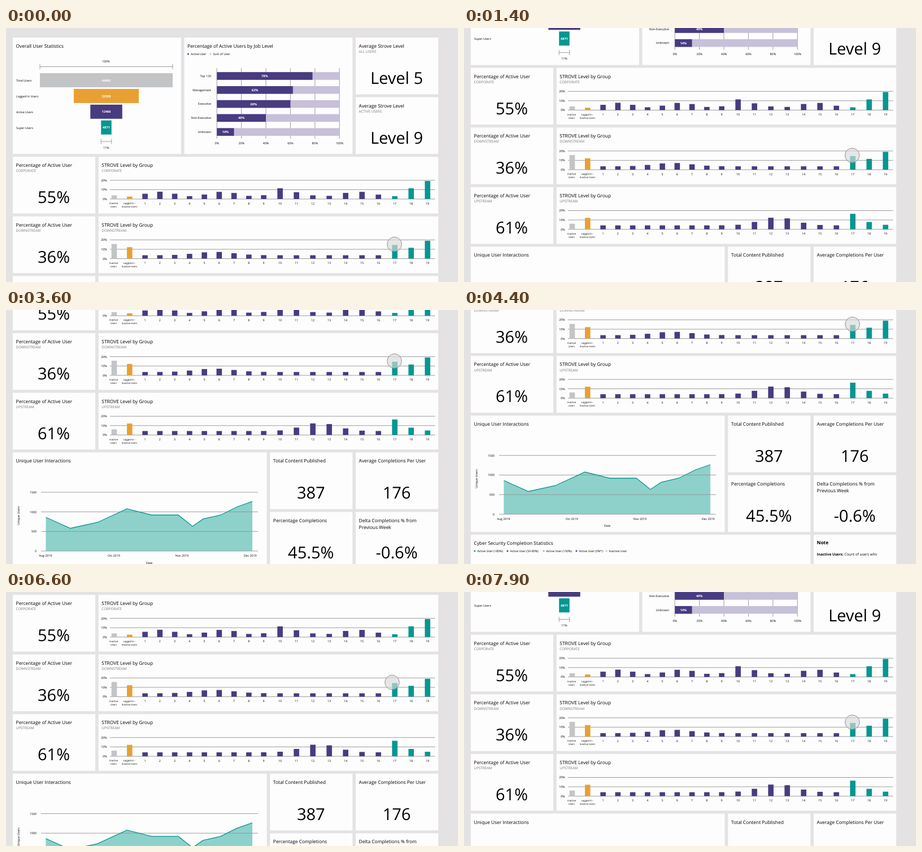
An HTML page for the animation above (8 s loop, 800 by 450 pixels).

```html
<!DOCTYPE html>
<html lang="en">
<head>
<meta charset="utf-8">
<title>User statistics dashboard</title>
<style>
  html, body { margin: 0; width: 100%; height: 100%; overflow: hidden; background: #e4e2e3; }
  svg { display: block; width: 100vw; height: 100vh; }
  text { font: 5.3px "Open Sans", "Noto Sans", sans-serif; fill: #000; text-rendering: geometricPrecision; }
  .title { font-size: 8.4px; }
  .sub { font-size: 6.25px; fill: #777; }
  .value { font-size: 29px; }
  .tag { font-size: 5.6px; font-weight: 700; fill: #fff; }
  .tiny { font-size: 4.25px; }
  .note { font-size: 6.4px; }
  .bold { font-weight: 700; }
  .mid { text-anchor: middle; }
  .end { text-anchor: end; }
</style>
</head>
<body>
<svg viewBox="0 0 800 450">
  <g id="page"></g>
  <circle id="touch" r="12.8" fill="#dadada" fill-opacity=".66" stroke="#858585" stroke-width=".9"/>
</svg>
<script>
const GREY = '#c3c4c6', ORANGE = '#e9a033', PURPLE = '#483b80', TEAL = '#069691', LILAC = '#c7c0d9', RULE = '#929294';
const page = document.getElementById('page');
const touch = document.getElementById('touch');

function add(tag, attrs, content) {
  const node = document.createElementNS('http://www.w3.org/2000/svg', tag);
  for (const key in attrs) node.setAttribute(key, attrs[key]);
  if (content) node.textContent = content;
  return page.appendChild(node);
}
const text = (x, y, content, cls = '') => add('text', { x, y, class: cls }, content);
const rect = (x, y, width, height, fill) => add('rect', { x, y, width, height, fill });
const line = (x1, y1, x2, y2, width = .9) =>
  add('line', { x1, y1, x2, y2, stroke: RULE, 'stroke-width': width });

// The dashboard is a grid of five columns
const colX = col => 12 + col * 151.75;
const rowY = row => 17 + row * 105.6;

function card(col, row, cols, rows, title, sub, value) {
  const x = colX(col), y = rowY(row), width = cols * 151.75 - 5.7;
  rect(x, y, width, rows * 105.6 - 5.1, '#fdfdfe');
  text(x + 5.6, y + 18, title, 'title');
  if (sub) text(x + 5.6, y + 27.2, sub, 'sub');
  if (value) text(x + width / 2 - .5, y + 82, value, 'value mid');
}

function legend(y, items) {
  for (const [x, color, label] of items) {
    add('circle', { cx: x, cy: y - 2, r: 1.5, fill: color });
    text(x + 4.4, y, label);
  }
}

function bracket(width, y) {
  const left = 177.5 - width / 2, right = left + width;
  line(left, y, right, y);
  for (const x of [left, right]) line(x, y - 4.5, x, y + 4.5);
}

function funnel() {
  card(0, 0, 2, 2, 'Overall User Statistics');
  text(177, 61, '100%', 'mid');
  bracket(235, 68.5);
  [['Total Users', 235, GREY, '44662'], ['Logged In Users', 115, ORANGE, '22559'],
   ['Active Users', 56.5, PURPLE, '12466'], ['Super Users', 18.5, TEAL, '4871']
  ].forEach(([label, width, color, count], i) => {
    const y = 80 + i * 27.9;
    rect(177.5 - width / 2, y, width, 25, color);
    text(18, y + 15, label);
    text(177.5, y + 14.6, count, 'tag mid');
  });
  bracket(18.5, 201);
  text(177.5, 213.8, '11%', 'mid');
}

function jobLevels() {
  const left = 373.2, scale = 2.17;
  card(2, 0, 2, 2, 'Percentage of Active Users by Job Level');
  legend(48, [[322.5, PURPLE, 'Active User'], [362, LILAC, 'Sum of User']]);
  for (let percent = 0; percent <= 100; percent += 20) {
    const x = left + percent * scale;
    line(x, 71, x, 196);
    text(x, 205.6, percent + '%', 'mid');
  }
  [['Top 120', 78], ['Management', 62], ['Executive', 60], ['Non-Executive', 40], ['Unknown', 14]
  ].forEach(([label, percent], i) => {
    const y = 78.2 + i * 24.8;
    rect(left, y, 100 * scale, 13.6, LILAC);
    rect(left, y, percent * scale, 13.6, PURPLE);
    text(363, y + 8.6, label, 'end');
    text(left + percent * scale / 2, y + 8.8, percent + '%', 'tag mid');
  });
}

// Purple bars follow the profile; the outer ones are given directly
function groupRow(row, name, share, idle, profile, leaders) {
  card(0, row, 1, 1, 'Percentage of Active User', name, share);
  card(1, row, 4, 1, 'STROVE Level by Group', name);
  const y = rowY(row), base = y + 74.8;
  for (let i = 0; i < 3; i++) {
    line(184, base - i * 16.6, 759.5, base - i * 16.6);
    text(178.7, base + 1.9 - i * 16.6, i * 10 + '%', 'end');
  }
  let x = 191.5;
  for (let n = -1; n <= 19; n++) {
    const height = n < 1 ? idle[n + 1] : n < 17 ? profile(n) : leaders[n - 17];
    rect(x - 4.8, base - height, 9.6, height, n < 0 ? GREY : n < 1 ? ORANGE : n < 17 ? PURPLE : TEAL);
    if (n > 0) text(x, y + 84.4, n, 'mid');
    x += n < 1 ? 27.3 : n < 9 ? 26.25 : 29;
  }
  [['Inactive', 'Users'], ['Logged In -', 'Inactive Users']].forEach((words, i) =>
    words.forEach((word, k) => text(190.5 + i * 28, y + 84 + k * 5.9, word, 'tiny mid')));
}

function interactions() {
  card(0, 5, 3, 2, 'Unique User Interactions');
  const base = 719.8;
  const top = [[70.5, 660], [114, 679.5], [162, 669], [214, 645], [258, 656], [305, 656],
    [330, 676], [349, 663], [380, 656], [409, 641.5], [436, 632]];
  add('polygon', { points: [...top, [436, base], [70.5, base]].join(' '), fill: '#8dd1ca' });
  for (let i = 0; i < 4; i++) {
    line(62, base - i * 34.7, 446, base - i * 34.7);
    text(54, base + 2 - i * 34.7, i * 500 + '', 'end');
  }
  add('polyline', { points: top.join(' '), fill: 'none', stroke: TEAL, 'stroke-width': 1.3 });
  ['Aug', 'Oct', 'Nov', 'Dec'].forEach((month, i) => text(70 + i * 120.7, 730, month + ' 2019', 'mid'));
  text(253.5, 742.3, 'Date', 'mid');
  text(0, 0, 'Unique Users', 'mid').setAttribute('transform', 'translate(24 657) rotate(-90)');
}

const bump = (n, center, width) => Math.exp(-(((n - center) / width) ** 2));

funnel();
jobLevels();
card(4, 0, 1, 1, 'Average Strove Level', 'ALL USERS', 'Level 5');
card(4, 1, 1, 1, 'Average Strove Level', 'ACTIVE USERS', 'Level 9');
groupRow(2, 'CORPORATE', '55%', [6.5, 4.3],
  n => 9 + 4 * Math.cos((n - 2) * 1.48) + 7 * bump(n, 10, .5), [5, 19, 32]);
groupRow(3, 'DOWNSTREAM', '36%', [26, 20.3], n => 6 + 6 * bump(n, 5.7, 1.8), [24.2, 19.2, 31.7]);
groupRow(4, 'UPSTREAM', '61%', [10, 20.3], n => 7 + 14.5 * bump(n, 12.4, 1.5), [27.5, 13, 8]);
interactions();
card(3, 5, 1, 1, 'Total Content Published', '', '387');
card(4, 5, 1, 1, 'Average Completions Per User', '', '176');
card(3, 6, 1, 1, 'Percentage Completions', '', '45.5%');
card(4, 6, 1, 1, 'Delta Completions % from', '', '-0.6%');
text(624.6, 680.5, 'Previous Week', 'title');
card(0, 7, 4, 2, 'Cyber Security Completion Statistics');
legend(787, [[19, TEAL, 'Active User (>80%)'], [77, PURPLE, 'Active User (50-80%)'],
  [141, ORANGE, 'Active User (<50%)'], [199, PURPLE, 'Active User (0%*)'], [252, GREY, 'Inactive User']]);
card(4, 7, 1, 2, '');
text(624.6, 772.6, 'Note', 'title bold');
text(624.6, 793.3, '', 'note').innerHTML =
  '<tspan class="bold">Inactive Users:</tspan> Count of users who';

const drags = [
  { start: 0, end: 2230, to: 202 },
  { start: 3000, end: 4260, to: 358 },
  { start: 5700, end: 7400, to: 152.5 }
];
// Cosine ease with a longer tail than start
const ease = u => (1 - Math.cos(Math.PI * u ** .8)) / 2;

function scrollAt(time) {
  let scroll = 0;
  for (const { start, end, to } of drags) {
    const progress = Math.min(1, Math.max(0, (time - start) / (end - start)));
    scroll += (to - scroll) * ease(progress);
  }
  return scroll;
}

const origin = performance.now();
function draw() {
  const elapsed = Math.max(0, performance.now() - origin) % 8000;
  const scroll = scrollAt(Math.floor(elapsed / 100) * 100);
  page.setAttribute('transform', `translate(0 ${-scroll})`);
  // The finger holds the page and sways slightly left mid-drag
  touch.setAttribute('cx', 687.5 - 4.5 * bump(scroll, 212, 35));
  touch.setAttribute('cy', 383.2 - scroll);
  requestAnimationFrame(draw);
}
draw();
</script>
</body>
</html>
```
